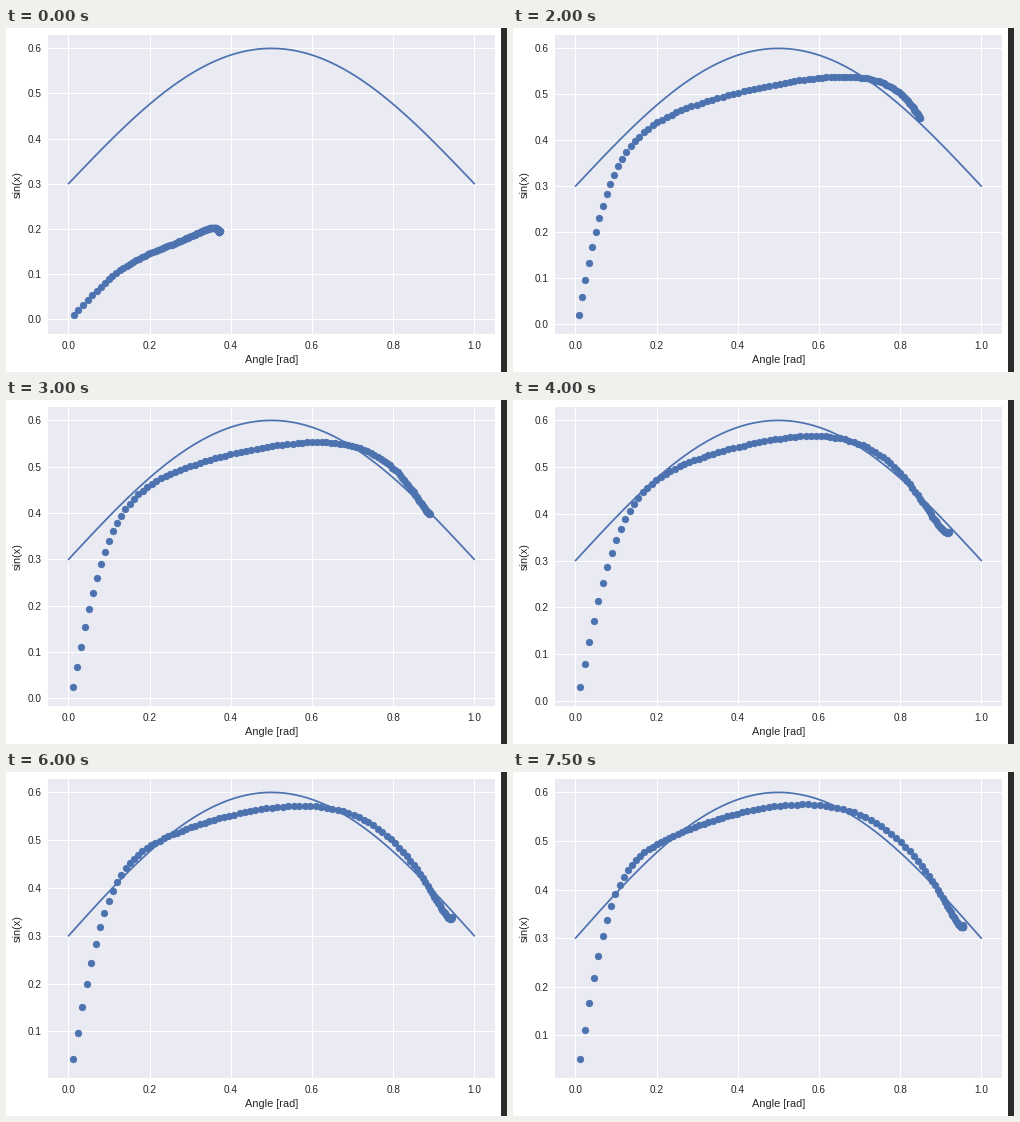
These frames come from a looping animation (501 by 344 pixels, 8000 ms). A matplotlib script:

```python
import numpy as np
import matplotlib.pyplot as plt
from matplotlib.animation import FuncAnimation
from matplotlib.patches import Rectangle
from matplotlib.ticker import MultipleLocator

W, H, DPI = 501, 344, 72
LEFT, TOP, AX_W, AX_H = 42.2, 6.8, 446.4, 299
MARGIN = AX_H / 22
LOWEST_DOT = 287.3
FRAMES, INTERVAL, COUNT = 16, 500, 100
BLUE, INK = "#4C72B0", "#262626"

plt.rcParams.update({
    "font.family": "Liberation Sans", "text.color": INK,
    "axes.labelcolor": INK, "axes.labelsize": 11,
    "axes.facecolor": "#EAEAF2", "axes.edgecolor": "white",
    "axes.linewidth": 0, "axes.grid": True, "axes.axisbelow": True,
    "grid.color": "white", "grid.linewidth": 1, "grid.linestyle": "-",
    "xtick.labelsize": 10, "ytick.labelsize": 10,
    "xtick.color": INK, "ytick.color": INK,
    "xtick.major.size": 0, "ytick.major.size": 0,
    "xtick.major.pad": 7, "ytick.major.pad": 7,
})

# How each parameter of the fit develops; training slows down, so time is log
STEPS = np.log1p([0, 2, 4, 8, 15])
REACH = [0.373, 0.740, 0.862, 0.931, 0.958]
PACE = [3.4, 1.2, 0.95, 1.25, 1.2]
CROWD = [3.0, 6.0, 3.3, 3.3, 5.0]
POWER = [3.0, 2.5, 2.5, 3.1, 4.0]
RISE = [0.108, 0.325, 0.385, 0.428, 0.432]
RISE_WIDTH = [0.11, 0.125, 0.108, 0.092, 0.0745]
START = [0.0032, 0.0049, 0.0054, 0.0045, 0.0018]
SLOPE = [0.2, 0.36, 0.36, 0.36, 0.36]
DROP = [0.14, 0.36, 0.385, 0.455, 0.485]
DROP_AT = [0.8, 0.93, 0.83, 0.73, 0.72]
DROP_WIDTH = [0.14, 0.18, 0.14, 0.1, 0.088]

u = np.arange(1, COUNT + 1) / COUNT


def fit(step):
    """Dot positions: a saturating x, and a steep rise, ramp and drop in y."""
    def at(values):
        return np.interp(np.log1p(step), STEPS, values)

    x = at(REACH) * (1 - np.exp(-at(PACE) * u - at(CROWD) * u ** at(POWER)))
    rise = at(RISE) * np.tanh((u - at(START)) / at(RISE_WIDTH))
    drop = at(DROP) / (1 + np.exp((at(DROP_AT) - u) / at(DROP_WIDTH)))
    return x, rise + at(SLOPE) * u - drop


fig = plt.figure(figsize=(W / DPI, H / DPI), dpi=DPI, facecolor="white")
ax = fig.add_axes([LEFT / W, 1 - (TOP + AX_H) / H, AX_W / W, AX_H / H])
fig.add_artist(Rectangle((495 / W, 0), 6 / W, 1, color="#2b2b2b", lw=0))

ax.set_xlim(-0.05, 1.05)
ax.xaxis.set_major_locator(MultipleLocator(0.2))
ax.yaxis.set_major_locator(MultipleLocator(0.1))
ax.set_xlabel("Angle [rad]")
ax.set_ylabel("sin(x)")

xs = np.linspace(0, 1, 200)
ax.plot(xs, 0.3 + 0.3 * np.sin(np.pi * xs), color=BLUE, lw=1.75,
        solid_capstyle="round")
dots = ax.scatter([], [], s=49, color=BLUE, linewidths=0.3)


def draw(i):
    x, y = fit(i)
    # The y axis always runs from the first dot to the curve's peak
    scale = (LOWEST_DOT - TOP - MARGIN) / (0.6 - y[0])
    top = 0.6 + MARGIN / scale
    ax.set_ylim(top - AX_H / scale, top)
    dots.set_offsets(np.column_stack([x, y]))
    return [dots]


anim = FuncAnimation(fig, draw, frames=FRAMES, interval=INTERVAL,
                     repeat=True, repeat_delay=0, blit=False)
plt.show()
```
